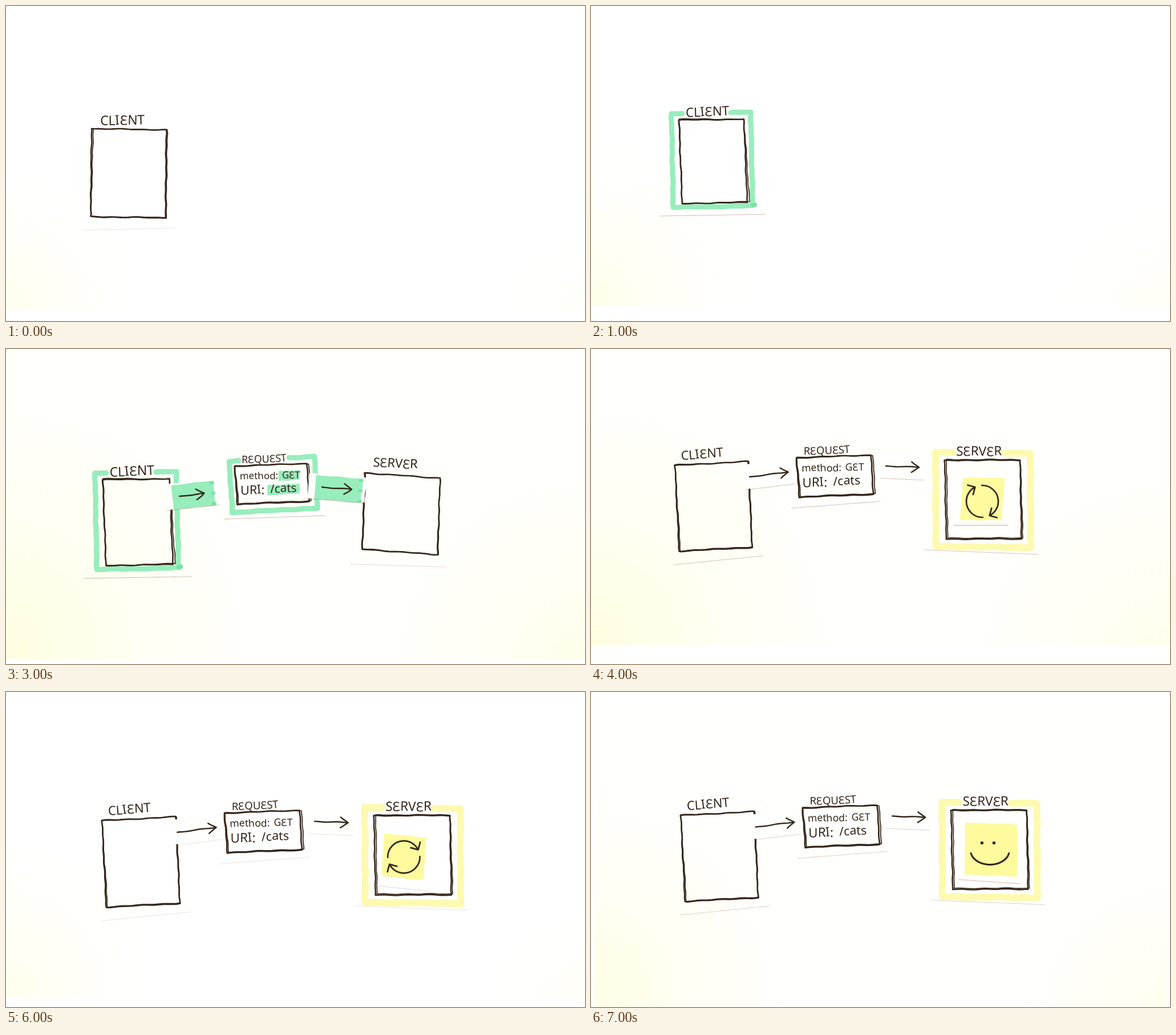
Animation, 1015 px wide and 552 px high, one loop 8 s. Source, as an HTML page with a canvas:

```html
<!DOCTYPE html>
<html lang="en">
<head>
<meta charset="utf-8">
<title>Request cycle</title>
<style>
html, body { margin: 0; width: 100%; height: 100%; overflow: hidden; background: #fff; }
canvas { display: block; }
</style>
</head>
<body>
<canvas id="stage" width="1015" height="552" role="img"
  aria-label="CLIENT sends REQUEST (method: GET, URI: /cats) to SERVER"></canvas>
<script>
const ctx = document.getElementById('stage').getContext('2d');
const WIDTH = 1015, HEIGHT = 552;
const INK = '#35261a', GREEN = '#98edbc', DEEP_GREEN = '#79e3a6', OUTLINE = '#fdfab0', PATCH = '#fefa9e';

// Repeatable noise in -1..1.
const noise = seed => {
  const v = Math.sin(seed * 127.1 + 3.7) * 43758.5;
  return (v - Math.floor(v)) * 2 - 1;
};

function at(x, y, scale, angle, draw) {
  ctx.save();
  ctx.translate(x, y);
  ctx.rotate(angle);
  ctx.scale(scale, scale);
  draw();
  ctx.restore();
}

// Hand lettering: round E, letters slightly turned and lifted.
function write(text, x, y, size, slope = 0) {
  at(x, y, 1, slope, () => {
    ctx.font = `500 ${size}px "Noto Sans", sans-serif`;
    ctx.fillStyle = INK;
    let pen = 0;
    [...text.replace(/E/g, 'Ɛ')].forEach((letter, i) => {
      const seed = letter.charCodeAt(0) + i;
      at(pen, noise(seed) * .8, 1, noise(seed + 9) * .05, () => ctx.fillText(letter, 0, 0));
      pen += ctx.measureText(letter).width;
    });
  });
}

// Path through points with a slightly unsteady hand.
function trace(points, wobble) {
  ctx.beginPath();
  ctx.moveTo(...points[0]);
  points.slice(1).forEach(([x1, y1], i) => {
    const [x0, y0] = points[i];
    const length = Math.hypot(x1 - x0, y1 - y0), steps = Math.ceil(length / 6);
    for (let k = 1; k <= steps; k++) {
      const x = x0 + (x1 - x0) * k / steps, y = y0 + (y1 - y0) * k / steps;
      const shake = wobble * Math.sin(x * .11 + y * .08) * Math.sin(x * .05 - y * .17);
      ctx.lineTo(x - shake * (y1 - y0) / length, y + shake * (x1 - x0) / length);
    }
  });
}

function line(points, color = INK, width = 2.4, wobble = .8) {
  trace(points, wobble);
  ctx.strokeStyle = color;
  ctx.lineWidth = width;
  ctx.stroke();
}

function area(points, color) {
  trace(points, .8);
  ctx.fillStyle = color;
  ctx.fill();
}

// Corners clockwise from top left; tilt slopes the top, lean slants the sides.
const quad = (x, y, w, h, tilt = 0, lean = 0) => [
  [x, y], [x + w, y + w * tilt], [x + w + h * lean, y + h + w * tilt], [x + h * lean, y + h]
];

// Two passes of the pen, the second one lighter and less exact.
function box(...shape) {
  const corners = quad(...shape);
  const second = corners.map(([x, y], i) => [x + 2 + noise(x + i) * 2, y + noise(y + i) * 2]);
  line([...corners, corners[0]], INK, 2.5);
  line([...second, second[0]], INK, 1.6);
}

// Marker outline, open at the top between two points for the label.
function outline(color, width, gapStart, gapEnd, ...shape) {
  const [tl, tr, br, bl] = quad(...shape);
  const top = x => [x, tl[1] + (x - tl[0]) * (tr[1] - tl[1]) / (tr[0] - tl[0])];
  line([top(gapStart), tl, bl, br, tr, top(gapEnd)], color, width);
}

function edge(x, y, width, slope, alpha = .5) {
  line([[x, y], [x + width, y + width * slope]], `rgba(165,125,100,${alpha})`, 1, 0);
}

function arrowCard(x, y, length, angle, alpha, green) {
  const pad = green ? 24 : 9;
  at(x, y, 1, angle, () => {
    area(quad(-pad, -23, length + pad * 2, 44), '#fffffd');
    if (green) {
      area(quad(-12, -20, length + 30, 42), GREEN);
      for (const tooth of [-17, 1, 19]) line([[length + 14, tooth], [length + 17, tooth]], DEEP_GREEN, 5);
    }
    edge(-pad, 22, length + pad * 2, 0, alpha);
    line([[0, 0], [length, 0]]);
    line([[length - 13, -9], [length, 0], [length - 13, 9]]);
  });
}

function request(x, y, scale, alpha, green) {
  at(x, y, scale, 0, () => {
    if (green) outline(GREEN, 9, 7, 93, -9, -9, 145, 88, -.055, .06);
    write('REQUEST', 12, -5, 17.5, -.05);
    box(0, 0, 123, 65, -.04, .07);
    if (green) {
      area(quad(75, 8, 36, 17, -.05), GREEN);
      area(quad(56, 32, 55, 17, -.05), GREEN);
    }
    write('method:', 9, 23, 16.5, -.03);
    write('GET', 81, 21, 16.5, -.03);
    write('URI:', 10, 48, 21, -.03);
    write('/cats', 61, 45, 20, -.04);
    if (green) edge(-18, 90, 172, -.035, alpha);
    else edge(-8, 83, 147, -.077, alpha);
  });
}

function plainClient() {
  write('CLIENT', 165, 209, 23, -.02);
  box(150, 215, 131, 154, .015, -.01);
  edge(136, 393, 162, -.025, .2);
}

function greenClient() {
  outline(GREEN, 9, 162, 247, 143, 211, 139, 164, -.022, .02);
  line([[286, 371], [289, 371]], DEEP_GREEN, 8);
  write('CLIENT', 168, 217, 22.5, -.05);
  box(156, 222, 114, 146, -.015, .04);
  edge(124, 390, 184, -.016);
}

function sending() {
  greenClient();
  request(381, 199, 1, .5, true);
  arrowCard(287, 250, 42, -.11, .5, true);
}

function plainServer() {
  write('SERVER', 643, 206, 22, .05);
  box(629, 217, 132, 134, .072, -.035);
  edge(604, 377, 167, .03, .28);
  arrowCard(554, 242, 52, .08, .5, true);
}

function processing(alpha, card) {
  write('CLIENT', 158, 195, 22, -.09);
  box(147, 204, 128, 150, -.055, .05);
  edge(146, 378, 156, -.1, alpha);
  request(360, 191, 1.06, alpha);
  arrowCard(278, 224, 68, -.12, alpha);
  arrowCard(517, 205, 58, .04, alpha);

  outline(OUTLINE, 12, 634, 725, 604, 181, 166, 165, .01, .005);
  write('SERVER', 640, 187, 22.5);
  box(620, 195, 132, 138, 0, .02);
  edge(585, 352, 199, .04, alpha);
  card(alpha);
}

function cycle(x, y, turn) {
  const radius = 28;
  at(x, y, 1, turn, () => {
    for (const half of [0, Math.PI]) {
      ctx.save();
      ctx.rotate(half);
      ctx.beginPath();
      ctx.arc(0, 0, radius, -2.7, 0);
      ctx.moveTo(radius - 10, -9);
      ctx.lineTo(radius, 0);
      ctx.lineTo(radius + 9, -10);
      ctx.strokeStyle = INK;
      ctx.lineWidth = 2.7;
      ctx.stroke();
      ctx.restore();
    }
  });
}

// Each step turns the arrows by about an eighth of a circle.
const spin = step => alpha => {
  const tilt = Math.min(step, 1) * .1, x = 686 - 7 * step;
  area(quad(x - 34, 226, 73, 74, tilt, -.07), PATCH);
  edge(x - 50, 309 + step * 4, 95, tilt, alpha * 1.5);
  cycle(x, 267, 1.1 + step * Math.PI / 4);
};

function smile(alpha) {
  area(quad(644, 216, 92, 91, .04), PATCH);
  edge(633, 316, 108, .07, alpha * 1.5);
  ctx.fillStyle = ctx.strokeStyle = INK;
  for (const eye of [674, 695]) {
    ctx.beginPath();
    ctx.arc(eye, 252, 2.7, 0, Math.PI * 2);
    ctx.fill();
  }
  ctx.beginPath();
  ctx.ellipse(688, 265, 34, 25, 0, .2, Math.PI - .2);
  ctx.lineWidth = 3;
  ctx.stroke();
}

function glow(x, y, radius, alpha) {
  const g = ctx.createRadialGradient(x, y, 0, x, y, radius);
  g.addColorStop(0, `rgba(255,253,205,${alpha})`);
  g.addColorStop(.5, `rgba(255,253,215,${alpha * .45})`);
  g.addColorStop(1, 'rgba(255,253,225,0)');
  ctx.fillStyle = g;
  ctx.fillRect(0, 0, WIDTH, HEIGHT);
}

// White sheet, warmer towards its lower corners.
function paper(warmth, bottom, margin = 0) {
  ctx.fillStyle = '#fff';
  ctx.fillRect(0, 0, WIDTH, HEIGHT);
  ctx.save();
  ctx.beginPath();
  ctx.rect(margin, 0, WIDTH - margin * 2, bottom);
  ctx.clip();
  glow(0, 520, 200 + warmth * 300, .3 + warmth * .4);
  glow(WIDTH, 560, 120 + warmth * 300, .15 + warmth * .35);
  ctx.fillStyle = `rgba(255,251,225,${warmth * warmth * .15})`;
  ctx.fillRect(0, 0, WIDTH, HEIGHT);
  ctx.restore();
}

const scenes = [
  () => { paper(.1, 533); plainClient(); },
  () => { paper(.3, 524); at(-2, -22, 1, 0, greenClient); },
  () => { paper(.5, 546); sending(); },
  () => { paper(.8, 544); at(9, 1, 1.028, 0, sending); plainServer(); },
  () => { paper(.8, 519); at(0, 0, 1, 0, () => processing(.45, spin(0))); },
  () => { paper(.5, 545); at(18, 28, 1.004, 0, () => processing(.3, spin(1))); },
  () => { paper(.2, 536); at(20, 20, 1.008, 0, () => processing(.2, spin(2))); },
  () => { paper(.6, HEIGHT, 6); at(10, 12, 1.002, 0, () => processing(.35, smile)); }
];

ctx.lineCap = ctx.lineJoin = 'round';
const start = performance.now();
function render() {
  const time = (performance.now() - start) % 8000;
  scenes[Math.floor(time / 1000)]();
  requestAnimationFrame(render);
}
render();
</script>
</body>
</html>
```
